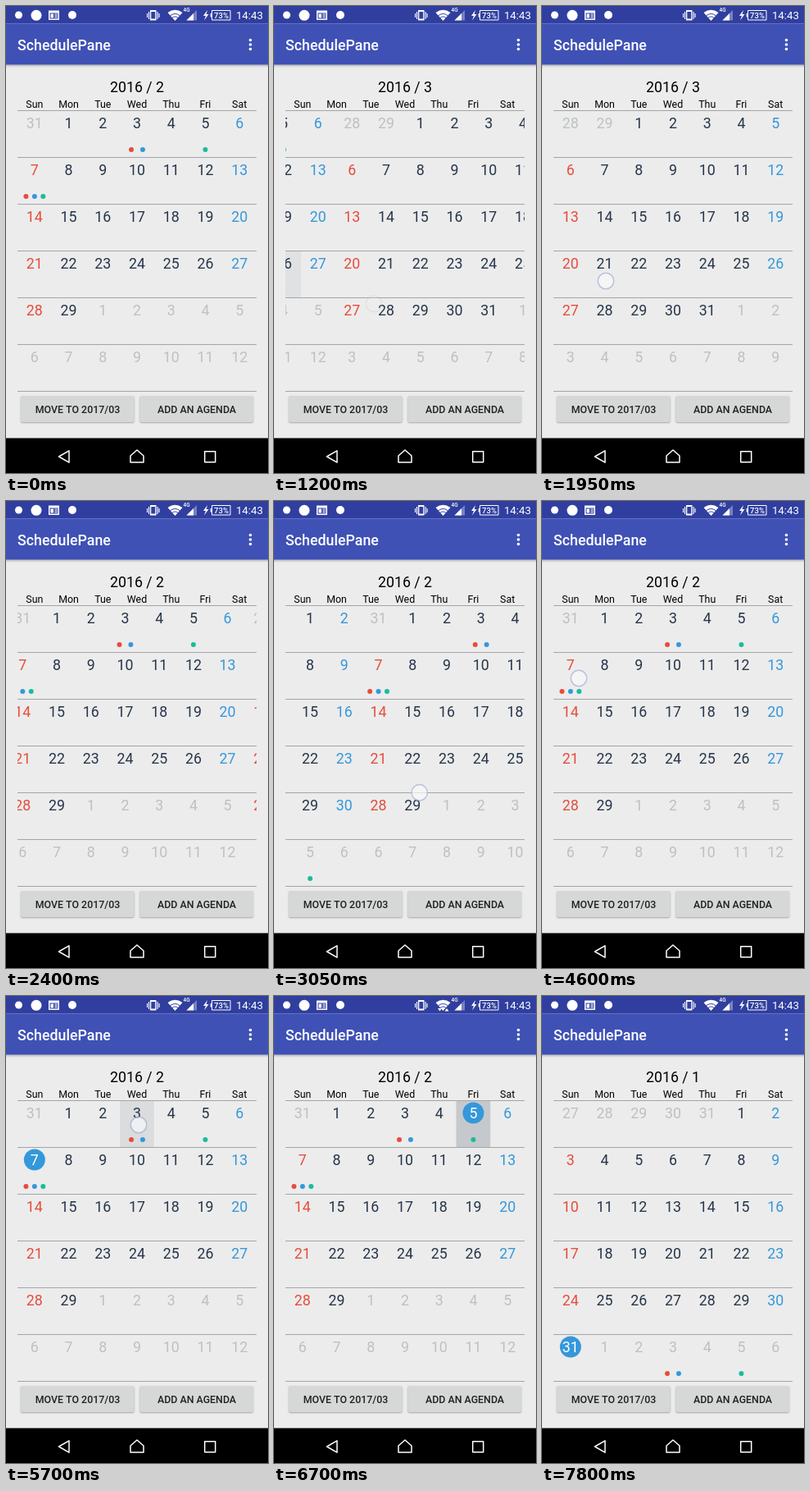
These frames come from a looping animation (320 px wide and 569 px high, 8000 ms). An HTML page with a canvas:

```html
<!DOCTYPE html>
<html lang="en">
<head>
<meta charset="utf-8">
<title>Calendar</title>
<style>
  html, body { margin: 0; width: 100%; height: 100%; overflow: hidden; background: #ececec; }
  canvas { display: block; width: 320px; height: 569px; }
</style>
</head>
<body>
<canvas id="stage"></canvas>
<script>
const W = 320, H = 569, LOOP = 8000;
const LEFT = 14, TOP = 127, PAGE = 292, CELL = PAGE / 7, ROW = 57;
const RED = '#e74c3c', BLUE = '#3498db', GREEN = '#1abc9c', DARK = '#27364a', PALE = '#bdc1c4';
const AGENDA = { '2-3': [RED, BLUE], '2-5': [GREEN], '2-7': [RED, BLUE, GREEN] };

// Page moves: a finger drag followed by a quintic settle; x0 to x1 is the finger path.
const SWIPES = [
  { from: 2, to: 3, down: 900, up: 1110, end: 1600, x0: 245, x1: 122, y0: 330, y1: 363 },
  { from: 3, to: 2, down: 1950, up: 2200, end: 2700, x0: 78, x1: 180, y0: 335, y1: 345 },
  { from: 2, to: 1, down: 2900, up: 3060, end: 3450, x0: 85, x1: 190, y0: 350, y1: 356 },
  { from: 1, to: 2, down: 3700, up: 3870, end: 4250, x0: 231, x1: 126, y0: 367, y1: 372 },
  { from: 2, to: 1, down: 7380, up: 7380, end: 7600, x0: 0, x1: 0 }
];
const TAPS = [
  { at: 4600, x: 45, y: 216, month: 2, day: '2-7', peak: .2 },
  { at: 5600, x: 162, y: 157, month: 2, day: '2-3', peak: .2 },
  { at: 6450, x: 245, y: 158, month: 2, day: '2-5', peak: .2 },
  { at: 7250, x: 37, y: 152, month: 2, day: '1-31', peak: .2 }
];
const PRESSES = [{ at: 900, month: 2, day: '2-26', peak: .065 }, ...TAPS];
const TAP_LENGTH = 120;

const canvas = document.getElementById('stage');
const c = canvas.getContext('2d');
const dpr = window.devicePixelRatio || 1;
canvas.width = W * dpr;
canvas.height = H * dpr;

const clamp = v => Math.max(0, Math.min(1, v));

function rect(x, y, w, h, color) {
  c.fillStyle = color;
  c.fillRect(x, y, w, h);
}

function disc(x, y, r, color) {
  c.fillStyle = color;
  c.beginPath();
  c.arc(x, y, r, 0, Math.PI * 2);
  c.fill();
}

function poly(points, color, stroke) {
  c.beginPath();
  points.forEach(([x, y]) => c.lineTo(x, y));
  c.closePath();
  if (stroke) {
    c.strokeStyle = color;
    c.lineWidth = stroke;
    c.stroke();
  } else {
    c.fillStyle = color;
    c.fill();
  }
}

function text(str, x, y, size, color, align = 'center', weight = 400) {
  c.font = `${weight} ${size}px Roboto, sans-serif`;
  c.textAlign = align;
  c.fillStyle = color;
  c.fillText(str, x, y);
}

function fingerPath(s, t) {
  const u = clamp((t - s.down - 40) / (s.up - s.down - 40)) ** 1.6;
  return [s.x0 + (s.x1 - s.x0) * u, s.y0 + (s.y1 - s.y0) * u];
}

function pagePosition(t) {
  const s = SWIPES.filter(s => t >= s.down).pop();
  if (!s) return 2;
  if (t < s.up) return s.from + (s.x0 - fingerPath(s, t)[0]) / PAGE;
  const start = s.from + (s.x0 - s.x1) / PAGE;
  const left = (1 - clamp((t - s.up) / (s.end - s.up))) ** 5;
  return s.to + (start - s.to) * left;
}

function titleMonth(t) {
  const s = SWIPES.filter(s => t >= s.up).pop();
  return s ? s.to : 2;
}

function selectedDay(t) {
  const tap = TAPS.filter(p => t >= p.at + TAP_LENGTH).pop();
  return tap && tap.day;
}

function pressAlpha(month, day, t) {
  const p = PRESSES.find(p => p.month === month && p.day === day);
  if (!p) return 0;
  const dt = t - p.at;
  return p.peak * Math.min(clamp((dt - 40) / 130), clamp((500 - dt) / 210));
}

function drawMonth(month, x0, t) {
  const lead = new Date(2016, month - 1, 1).getDay();
  const selected = selectedDay(t);
  for (let i = 0; i < 42; i++) {
    const date = new Date(2016, month - 1, 1 - lead + i);
    const key = `${date.getMonth() + 1}-${date.getDate()}`;
    const col = i % 7;
    const x = x0 + col * CELL, y = TOP + Math.floor(i / 7) * ROW;
    const mid = x + CELL / 2;
    const alpha = pressAlpha(month, key, t);
    if (alpha > 0) rect(x, y, CELL, ROW, `rgba(44,62,80,${alpha})`);

    let color = col === 0 ? RED : col === 6 ? BLUE : DARK;
    if (date.getMonth() !== month - 1) color = PALE;
    if (key === selected) {
      disc(mid, y + 15.5, 13, BLUE);
      color = '#fff';
    }
    text(date.getDate(), mid, y + 22.4, 17.8, color);

    const dots = AGENDA[key] || [];
    dots.forEach((dot, k) => disc(x + CELL * (k + 1) / (dots.length + 1), y + 48, 3, dot));
  }
}

function drawCalendar(t) {
  const month = titleMonth(t);
  text(`2016 / ${month}`, 160, 105.3, 17.8, '#000');
  ['Sun', 'Mon', 'Tue', 'Wed', 'Thu', 'Fri', 'Sat'].forEach((name, i) =>
    text(name, LEFT + CELL * (i + .5), 123.5, 12.4, '#000'));

  c.save();
  c.beginPath();
  c.rect(LEFT, TOP, PAGE, 343);
  c.clip();
  const pos = pagePosition(t);
  for (let m = 1; m <= 3; m++) {
    const x = LEFT + (m - pos) * PAGE;
    if (Math.abs(m - pos) < 1) drawMonth(m, x, t);
  }
  for (let i = 0; i < 7; i++) rect(LEFT, TOP + i * ROW, PAGE, 1, '#a2a5a8');
  c.restore();
}

function drawPointer(t) {
  let spot, alpha = 1;
  const s = SWIPES.find(s => s.x0 && t >= s.down && t < s.up + 110);
  const tap = TAPS.find(p => t >= p.at && t < p.at + TAP_LENGTH);
  if (s) {
    spot = fingerPath(s, t);
    if (t >= s.up) alpha = .22;
  } else if (tap) {
    spot = [tap.x, tap.y];
  }
  if (!spot) return;
  c.globalAlpha = alpha;
  disc(...spot, 10, 'rgba(250,250,252,.65)');
  c.strokeStyle = 'rgba(150,160,205,.6)';
  c.lineWidth = 1.5;
  c.beginPath();
  c.arc(...spot, 9.7, 0, Math.PI * 2);
  c.stroke();
  c.globalAlpha = 1;
}

function drawStatusBar(t) {
  const bar = '#303f9f';
  rect(0, 0, W, 21.5, bar);
  disc(15.5, 11, 4.5, '#fff');
  disc(37, 11.3, 6.5, '#fff');
  disc(81, 11, 5, '#fff');

  rect(52, 5.5, 13, 11.5, '#fff');
  rect(53.5, 8.5, 10, 7, bar);
  rect(54.5, 9.5, 3.5, 5, '#fff');
  [9.5, 11.5, 13.5].forEach(y => rect(59.3, y, 3.5, 1, '#fff'));

  rect(176, 5, 7.5, 12.5, '#fff');
  rect(177.3, 7, 4.9, 8.5, bar);
  [172, 174, 184.5, 186.5].forEach((x, i) => {
    const inner = i === 1 || i === 2;
    rect(x, inner ? 7 : 9, 1.1, inner ? 9 : 5, '#fff');
  });

  c.fillStyle = '#fff';
  c.beginPath();
  c.moveTo(206.5, 18);
  c.lineTo(197.5, 8);
  c.quadraticCurveTo(206.5, 1.5, 215.5, 8);
  c.fill();
  c.strokeStyle = bar;
  c.lineWidth = 1;
  [5, 8.5].forEach(r => {
    c.beginPath();
    c.arc(206.5, 18, r, -2.4, -.74);
    c.stroke();
  });
  if (t >= 6500 && t < 7800) {
    poly([[208.5, 18.5], [211, 15], [213.5, 18.5]], '#fff');
    poly([[200, 15], [205, 15], [202.5, 18.5]], '#fff');
  }

  text('4G', 220.5, 7.3, 6.5, '#fff', 'center', 500);
  poly([[220.5, 17.5], [233, 5], [233, 17.5]], 'rgba(255,255,255,.35)');
  poly([[220.5, 17.5], [229, 9], [229, 17.5]], '#fff');
  poly([[246, 5], [241, 12], [244, 12], [242, 17.5], [247.5, 10], [244.6, 10]], '#fff');
  c.strokeStyle = '#fff';
  c.lineWidth = 1;
  c.strokeRect(251.5, 5.5, 22.5, 11.5);
  rect(249.7, 9, 1.6, 4.5, '#fff');
  text('73%', 263, 14.8, 9.5, '#fff', 'center', 500);
  text('14:43', 314, 16, 13.3, '#fff', 'right');
}

function drawToolbar() {
  rect(0, 21.5, W, 50, '#3f51b5');
  const shade = c.createLinearGradient(0, 71.5, 0, 75);
  shade.addColorStop(0, 'rgba(0,0,0,.22)');
  shade.addColorStop(1, 'rgba(0,0,0,0)');
  rect(0, 71.5, W, 3.5, shade);
  text('SchedulePane', 14, 53.6, 17.8, '#fff', 'left', 500);
  [41.5, 47, 52.5].forEach(y => disc(298.5, y, 1.8, '#fff'));
}

function drawButton(x, label) {
  c.save();
  c.shadowColor = 'rgba(0,0,0,.3)';
  c.shadowBlur = 2 * dpr;
  c.shadowOffsetY = dpr;
  c.fillStyle = '#d6d7d7';
  c.beginPath();
  c.roundRect(x, 475, 138.5, 32, 2);
  c.fill();
  c.restore();
  text(label, x + 69.5, 495.6, 12.4, '#212121', 'center', 500);
}

function drawNavBar() {
  rect(0, 526.5, W, 43, '#000');
  c.lineJoin = 'round';
  poly([[64.5, 549], [77, 541.8], [77, 556.2]], '#fff', 1.5);
  poly([[160, 541], [168, 548], [168, 556], [152, 556], [152, 548]], '#fff', 1.5);
  poly([[242.7, 542.7], [255.7, 542.7], [255.7, 555.7], [242.7, 555.7]], '#fff', 1.5);
}

function render(t) {
  c.setTransform(dpr, 0, 0, dpr, 0, 0);
  rect(0, 0, W, H, '#ececec');
  drawStatusBar(t);
  drawToolbar();
  drawCalendar(t);
  drawButton(18, 'MOVE TO 2017/03');
  drawButton(163.5, 'ADD AN AGENDA');
  drawNavBar();
  drawPointer(t);
}

const began = performance.now();
function tick() {
  render((performance.now() - began) % LOOP);
  requestAnimationFrame(tick);
}
tick();
</script>
</body>
</html>
```
